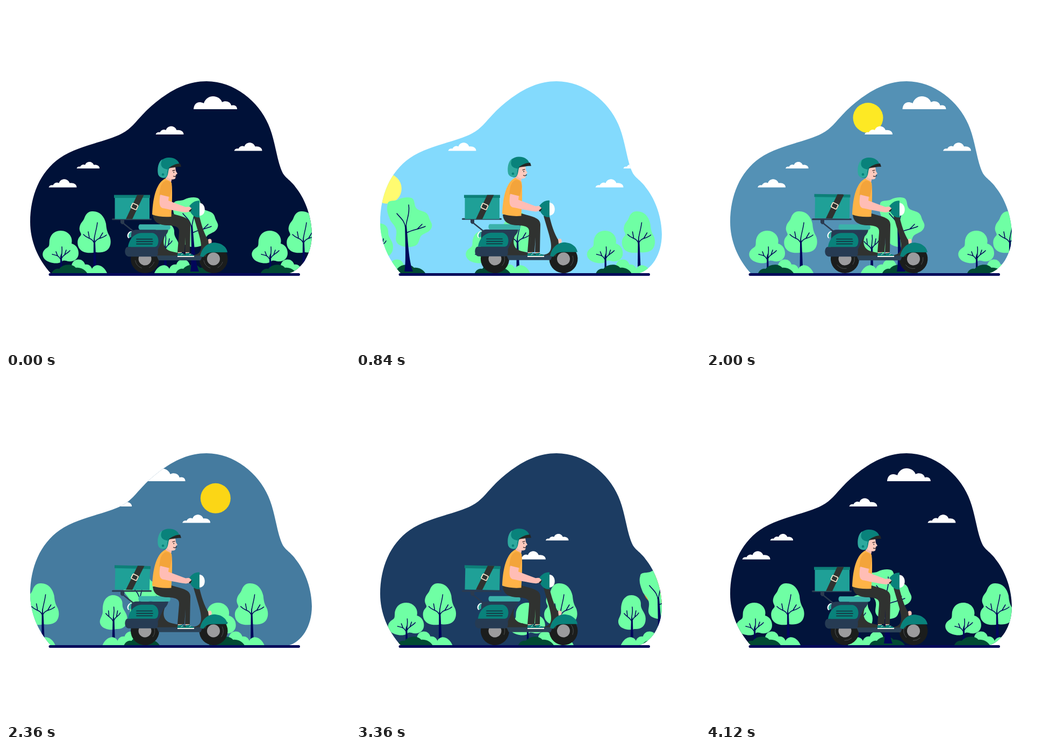
An HTML page that plays this animation: 640x640 px, repeating every 4.16 s.

```html
<!DOCTYPE html>
<html lang="en">
<head>
<meta charset="utf-8">
<title>Scooter delivery</title>
<style>
html, body { margin: 0; width: 100%; height: 100%; overflow: hidden; background: #fff; }
svg { display: block; width: 100%; height: 100%; }
.line { fill: none; stroke-linecap: round; stroke-linejoin: round; }
.wood { fill: none; stroke: #02065a; stroke-linecap: round; stroke-width: 1.5; }
</style>
</head>
<body>
<svg viewBox="0 0 640 640" xmlns="http://www.w3.org/2000/svg">
  <defs>
    <clipPath id="blob">
      <path d="M84 498C58 470 45 435 45 402C45 353 63 309 100 283C137 258 184 254 216 237C241 224 245 205 284 175C314 152 342 140 373 140C425 140 470 178 488 220C501 249 504 290 515 311C522 322 530 324 541 340C558 362 569 395 569 425C569 462 550 492 524 498Z"/>
    </clipPath>
    <g id="bigCloud"><path fill="#fff" d="M0 24C1 13 8 8 19 13C22 4 29 0 36 0C45 0 51 5 53 11C59 7 69 10 70 17C76 15 81 18 81 24Z"/></g>
    <g id="cloud"><path fill="#fff" d="M0 15C1 11 5 10 8 11C10 6 16 5 19 7C22-2 35-3 39 7C46 6 52 9 52 15Z"/></g>

    <g id="roundTree">
      <path fill="#6fffa4" d="M34 0C48 0 57 12 54 24C62 26 67 33 67 42C67 54 55 60 44 56C40 55 38 55 35 58C27 63 12 60 5 54C-3 46 0 37 8 32C14 29 12 25 13 17C16 5 24 0 34 0Z"/>
      <path fill="#02065a" d="M33 70L33 48L35 42L36 48L36.500 70Z"/>
      <path class="wood" d="M35 51C36 40 37 38 36 30M34 54C30 46 26 46 18 44M28 47L25 39M35 52C40 43 45 44 51 37M41 45L44 36"/>
    </g>
    <g id="tallTree">
      <path fill="#6fffa4" d="M27 0C41-1 50 9 53 23C54 33 55 38 59 45C64 55 62 68 54 73C47 77 40 77 34 76C26 78 6 80 1 64C-1 55 1 50 6 45C9 41 2 38 4 29C6 20 11 19 13 12C16 4 21 0 27 0Z"/>
      <path fill="#02065a" d="M29.500 106L30 58L31 46L33 58L35 103Z"/>
      <path class="wood" d="M31 60C30 46 35 38 37 21M31 59C26 48 19 52 11 43M22 49L20 38M32 58C37 48 45 52 54 44M41 50L47 40"/>
    </g>
    <g id="broadTree">
      <path fill="#6fffa4" d="M2 12C3 4 14 8 22 4C30 0 44-2 49 3C53 8 51 16 56 21C63 27 76 24 79 38C81 45 86 49 84 55C82 64 72 66 66 70C60 74 62 84 55 89C46 95 24 93 19 84C14 76 21 68 17 58C13 48 8 48 5 38C2 30-1 22 2 12Z"/>
      <path fill="#02065a" d="M33 138C36 125 35 90 34 52L37 52C40 82 41 118 49 138Z"/>
      <path class="wood" stroke-width="2" d="M35 57C34 43 25 38 19 30M36 56C36 42 44 32 41 14M37 66C48 60 58 60 72 54M57 59L66 50"/>
    </g>
    <g id="smallTree">
      <path fill="#6fffa4" d="M24 0C36 0 43 8 42 18C42 28 51 32 51 44C51 58 42 64 30 63C22 66 5 64 1 54C-2 46 3 42 5 34C6 28 4 24 7 14C10 5 17 0 24 0Z"/>
      <path fill="#02065a" d="M23 80L24 46L26 40L27 47L28 80Z"/>
      <path class="wood" d="M25 48C24 38 28 34 26 22M25 49C21 40 17 42 11 34M17 39L16 29M26 47C30 38 34 41 38 33M31 40L33 29"/>
    </g>
    <g id="lightBush"><path fill="#6fffa4" d="M0 25C0 13 5 9 11 11C13-4 33-4 36 9C42 8 47 11 49 17C54 6 70 8 77 25Z"/></g>
    <g id="darkBush"><path fill="#014a33" d="M0 16C3 9 9 7 14 8C20-1 38-3 45 6C53 5 62 9 66 16Z"/></g>

    <g id="pairGrove">
      <use href="#roundTree" y="418"/>
      <use href="#tallTree" x="65" y="382"/>
      <use href="#lightBush" x="43" y="472"/>
      <use href="#darkBush" x="17" y="481"/>
    </g>
    <g id="broadGrove">
      <use href="#smallTree" x="-39" y="404"/>
      <use href="#lightBush" transform="translate(43 472) scale(-1 1)"/>
      <use href="#darkBush" x="6" y="481"/>
      <use href="#broadTree" y="356"/>
    </g>
    <g id="groves">
      <use href="#pairGrove" x="68"/>
      <use href="#broadGrove" x="310"/>
      <use href="#pairGrove" x="457"/>
    </g>
    <g id="cloudSet">
      <use href="#bigCloud" x="349" y="168"/>
      <use href="#cloud" x="278.500" y="224"/>
      <use href="#cloud" x="424.500" y="254.500"/>
      <use href="#cloud" transform="translate(131.500 290) scale(.82)"/>
      <use href="#cloud" x="79.500" y="322.500"/>
    </g>
    <g id="wheel">
      <circle r="26.500" fill="#1b1d1c"/>
      <path class="line" stroke="#55595a" stroke-width=".8" d="M-18 3A18 18 0 0 0-6 17M8 16A18 18 0 0 0 17 6"/>
      <circle r="12" fill="#9b9b9d"/>
    </g>
  </defs>

  <g clip-path="url(#blob)">
    <rect id="sky" width="640" height="640"/>
    <circle id="sun" r="28"/>
    <g id="clouds"><use href="#cloudSet"/><use href="#cloudSet" x="619"/></g>
    <g id="trees"><use href="#groves"/><use href="#groves" x="614.500"/></g>
  </g>
  <path class="line" stroke="#02065a" stroke-width="5" d="M82 499.500H544.500"/>

  <use id="rearWheel" href="#wheel"/>
  <use id="frontWheel" href="#wheel"/>

  <g id="scooter">
    <path class="line" stroke="#2b3b50" stroke-width="2.500" d="M217 403L237 419"/>
    <path fill="#2b3b50" d="M213 397H220V404L216 406L213 403Z"/>
    <path class="line" stroke="#2b3b50" stroke-width="3" d="M198.500 396.500H269.500"/>
    <path fill="#fff" d="M231 419C225 422 224 429 228 432L234 428V419Z"/>
    <path fill="#2aa79b" d="M232 420C227 424 227 429 229 431L234 429V420Z"/>
    <path fill="#303230" d="M276 438L297 424C292 434 292 444 297 450C302 456 310 457 320 459L350 463C366 460 365 447 359 425L349 391L359 388C363 404 368 424 378 438L372 466H280Z"/>
    <path fill="#263b53" d="M233 423C234 417 238 416 244 416H302C301 422 298 426 293 430L282 454H232Z"/>
    <path fill="#263b53" d="M226 448H279C284 449 284 465 279 466H228C219 465 220 449 226 448Z"/>
    <path fill="#2b4257" d="M280 464H366L362 473H284Z"/>
    <path fill="#09827b" d="M227 448C229 434 238 423 252 422H273C281 424 285 432 283 441C282 446 280 448 276 448Z"/>
    <path class="line" stroke="#173542" stroke-width="1.800" d="M243 433.500H272M243 438H273M243 442.500H272"/>
    <path fill="#3bb2aa" d="M249 406H302C307 408 307 415 303 416H250C246 416 245 408 249 406Z"/>
    <path fill="#ffc6b8" d="M376 434C381 431 384 435 382 441L377 442Z"/>
    <path fill="#09827b" d="M361 465C364 451 372 442 386 440C402 440 411 449 412 458H385C374 458 370 463 367 467Z"/>
  </g>

  <g id="box">
    <path fill="#1fa097" d="M202.500 354H267V396.500H202.500Z"/>
    <path fill="#0d7f78" d="M201 351.500H268V357H201Z"/>
    <path fill="#303230" d="M244 351.500H256.500L235 396.500H223Z"/>
    <rect x="-5.500" y="-4.500" width="11" height="9" rx="1.500" transform="translate(239 373) rotate(25)" fill="none" stroke="#f7e3cb" stroke-width="1.800"/>
  </g>

  <g>
    <path fill="#f8b9a9" d="M320 456H327V462H320ZM334 456H341V462H334Z"/>
    <path fill="#f4f1e8" d="M319 464H336V467H319ZM334 464H350V467H334Z"/>
    <path fill="#09827b" d="M319 460L327 459L336 465H319ZM334 460L341 459C343 462 349 462 350 465H334Z"/>
    <path class="line" stroke="#f4f1e8" stroke-width=".8" d="M326 463L329 461M341 463L344 461"/>
    <path fill="#303230" d="M273 388C274 401 283 408 302 408C318 409 323 412 322 422L319 458H332L334 430L333 458H342L343 407C343 395 333 393 308 386Z"/>
  </g>

  <g id="rider">
    <path fill="#f8b9a9" d="M299 314H308V325L305 333L295 326Z"/>
    <path fill="#ffb347" d="M296 321C302 325 306 325 308 329C310 341 309 371 307.500 392C295 393 282 392 272 388C273 364 277 331 296 321Z"/>
    <path fill="#f3a43b" d="M298 325C305 325 308.500 331 308.500 338L305 355L285 352C287 342 286 329 298 325Z"/>
    <path fill="#ffbdb5" d="M287 351L303 355L302 362L334 374C339 373 343 373 345 376L344 382L335 384C318 382 302 378 291 376C284 373 285 362 287 351Z"/>
    <path fill="#ffc9bd" d="M301 299H315L316 307L319 312L316 314L315 321C311 324 304 323 300 318Z"/>
    <path class="line" stroke="#3b2a2a" stroke-width="1.300" d="M310 306.500L314 305.500M311.500 316.500C314 318 316 317 317.500 315.500"/>
    <path fill="#303230" d="M311.500 308.500h1.500v2h-1.500z"/>
    <path fill="#09827b" d="M283 302C284 288 293 282 303 282C315 282 321 288 323 295L305 301C301 304 303 312 299 318C295 323 285 319 283 311Z"/>
    <path fill="#2fa99e" d="M291 285C283 290 281 303 283 313C286 321 295 321 299 317C300 312 300 308 301 304C290 303 285 296 291 285Z"/>
    <circle cx="292" cy="313.500" r="2.300" fill="#09827b"/>
    <path fill="#252725" d="M302 302C308 297 316 293 324 293L326 299C317 299 310 301 302 302Z"/>
  </g>

  <g id="handlebar">
    <path class="line" stroke="#252725" stroke-width="3" d="M342 381L347 377"/>
    <path fill="#09827b" d="M341 372C346 365 353 361 360 362V393C353 394 347 390 343 383L346 377Z"/>
    <path fill="#fff" d="M360 366C373 367 373 390 360 390Z"/>
  </g>
</svg>
<script>
const LOOP = 4160, STEP = 40, DAY = 4080, LAP = 2040, LAP_WIDTH = 614.5;
const SKY = [[0, '001138'], [600, '85ddff'], [800, '85ddff'], [4040, '001138']];
const SUN = [[840, 'fffb70'], [1600, 'ffff33'], [2360, 'fbd616'], [2680, 'ffae18'], [3400, 'f57c1a']];

const byId = id => document.getElementById(id);
const place = (id, transform) => byId(id).setAttribute('transform', transform);
const paint = (id, color) => byId(id).setAttribute('fill', color);
const smooth = u => u * u * (3 - 2 * u);
const channels = hex => [0, 2, 4].map(i => parseInt(hex.slice(i, i + 2), 16));

function colorAt(keys, t, easeFirst) {
  const next = keys.findIndex(key => key[0] > t);
  if (next < 1) return '#' + keys[next ? keys.length - 1 : 0][1];
  const [from, a] = keys[next - 1], [to, b] = keys[next];
  let u = (t - from) / (to - from);
  if (easeFirst && next === 1) u = smooth(u);
  const end = channels(b);
  return `rgb(${channels(a).map((c, i) => Math.round(c + (end[i] - c) * u))})`;
}

function draw(t) {
  const day = t % DAY;
  const shift = `translate(${-LAP_WIDTH * (t % LAP) / LAP} 0)`;
  place('clouds', shift);
  place('trees', shift);
  paint('sky', colorAt(SKY, day, true));

  const angle = (day - 1980) * 0.0505 * Math.PI / 180;
  place('sun', `translate(${296.5 + 284 * Math.sin(angle)} ${492 - 284 * Math.cos(angle)})`);
  paint('sun', colorAt(SUN, day));

  // Engine rumble, plus one hop of the cargo box every half lap
  const bob = Math.cos(2 * Math.PI * day / 510);
  place('rider', `translate(0 ${bob * 0.9 - 0.9})`);
  place('scooter', `translate(0 ${bob * 0.25})`);
  place('handlebar', `translate(0 ${bob * 0.35})`);
  const hop = Math.max(0, Math.cos(Math.PI * (day % 1020 - 310) / 400));
  place('box', `translate(0 ${-2.4 * hop}) rotate(${1.3 * hop} 234 396)`);

  const spin = day / LAP * 360 * 4;
  place('rearWheel', `translate(258.500 470.500) rotate(${spin})`);
  place('frontWheel', `translate(386 470.500) rotate(${spin})`);
}

const start = performance.now();
function tick() {
  const t = (performance.now() - start) % LOOP;
  draw(Math.floor(t / STEP) * STEP);
  requestAnimationFrame(tick);
}
tick();
</script>
</body>
</html>
```
